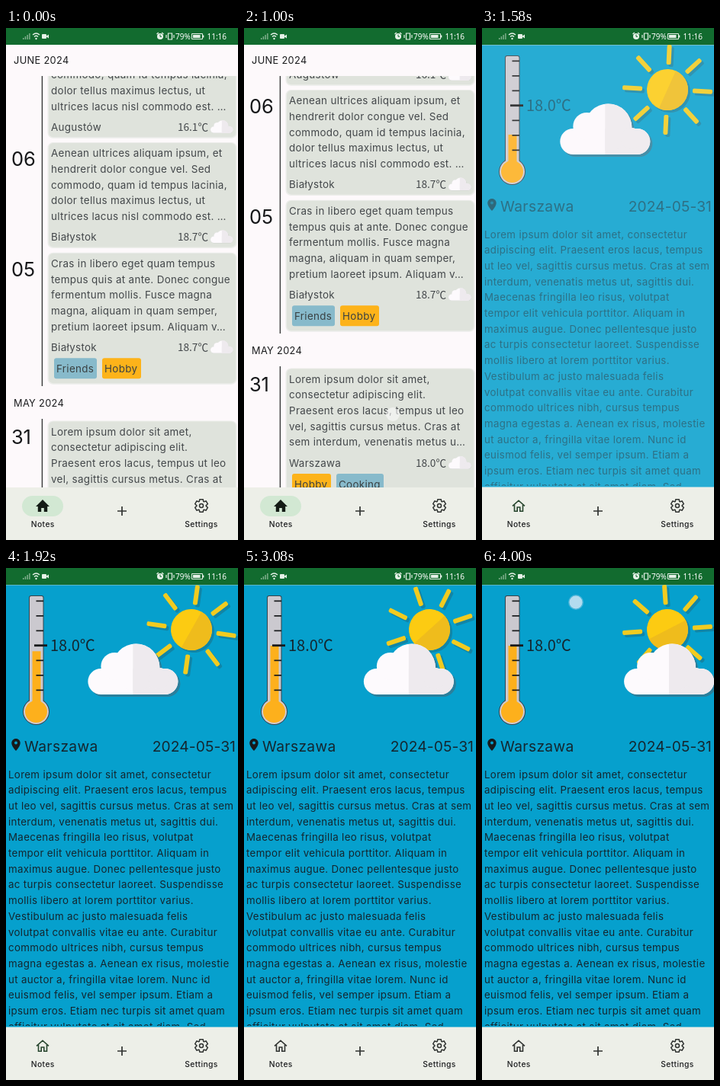
Recreate the animation shown at these times as an HTML page with a canvas. Size 304 px wide and 672 px high, loop 4.08 s.

```html
<!DOCTYPE html>
<html lang="en">
<head>
<meta charset="utf-8">
<title>Weather notes</title>
<style>
html, body { margin: 0; width: 100%; height: 100%; overflow: hidden; background: #fdf9fb; }
canvas { display: block; width: 304px; height: 672px; }
</style>
</head>
<body>
<canvas id="stage" width="304" height="672"></canvas>
<script>
const W = 304, H = 672, LOOP = 4080, STEP = 1000 / 12;
const PAGE_TOP = 22, NAV_TOP = 603, LINE = 20.68;
const BLUE = '#06a0cd', INK = '#1c1d1f', PAPER = '#fdf9fb';

const screen = document.getElementById('stage').getContext('2d');
const layer = document.createElement('canvas');
layer.width = W;
layer.height = H;
const detail = layer.getContext('2d');
let ctx = screen;

const clamp = v => Math.max(0, Math.min(1, v));
const progress = (t, start, length) => clamp((t - start) / length);
const easeOut = u => 1 - (1 - u) ** 2;
const easeSine = u => (1 - Math.cos(Math.PI * u)) / 2;

function rect(x, y, w, h, color) {
  ctx.fillStyle = color;
  ctx.fillRect(x, y, w, h);
}
function round(x, y, w, h, r, color) {
  ctx.fillStyle = color;
  ctx.beginPath();
  ctx.roundRect(x, y, w, h, r);
  ctx.fill();
}
function disc(x, y, r, color) {
  ctx.fillStyle = color;
  ctx.beginPath();
  ctx.arc(x, y, r, 0, 7);
  ctx.fill();
}
function stroke(path, color, width = 1.5) {
  ctx.strokeStyle = color;
  ctx.lineWidth = width;
  ctx.stroke(new Path2D(path));
}
function fill(path, color) {
  ctx.fillStyle = color;
  ctx.fill(new Path2D(path));
}
function text(str, x, y, size, color = INK, { align = 'left', weight = 400, space = 0.33, face = 'Inter' } = {}) {
  ctx.font = `${weight} ${size}px "${face}", "Noto Sans CJK JP", sans-serif`;
  ctx.letterSpacing = space + 'px';
  ctx.textAlign = align;
  ctx.fillStyle = color;
  ctx.fillText(str, x, y);
}
function degrees(str, x, y, size, color, align) {
  text(str, x, y, size, color, { align, space: 0, face: 'Noto Sans CJK SC' });
}
function at(x, y, draw, scale = 1, angle = 0) {
  ctx.save();
  ctx.translate(x, y);
  ctx.rotate(angle);
  ctx.scale(scale, scale);
  draw();
  ctx.restore();
}
function clipped(x, y, w, h, draw) {
  ctx.save();
  ctx.beginPath();
  ctx.rect(x, y, w, h);
  ctx.clip();
  draw();
  ctx.restore();
}
function faded(alpha, draw) {
  ctx.save();
  ctx.globalAlpha = alpha;
  draw();
  ctx.restore();
}

const aenean = ['Aenean ultrices aliquam ipsum, et', 'hendrerit dolor congue vel. Sed',
  'commodo, quam id tempus lacinia,', 'dolor tellus maximus lectus, ut',
  'ultrices lacus nisl commodo est. …'];
const cras = ['Cras in libero eget quam tempus', 'tempus quis at ante. Donec congue',
  'fermentum mollis. Fusce magna', 'magna, aliquam in quam semper,',
  'pretium laoreet ipsum. Aliquam v…'];
const lorem = ['Lorem ipsum dolor sit amet,', 'consectetur adipiscing elit.',
  'Praesent eros lacus, tempus ut leo', 'vel, sagittis cursus metus. Cras at',
  'sem interdum, venenatis metus u…'];
const note = ['Lorem ipsum dolor sit amet, consectetur', 'adipiscing elit. Praesent eros lacus, tempus',
  'ut leo vel, sagittis cursus metus. Cras at sem', 'interdum, venenatis metus ut, sagittis dui.',
  'Maecenas fringilla leo risus, volutpat', 'tempor elit vehicula porttitor. Aliquam in',
  'maximus augue. Donec pellentesque justo', 'ac turpis consectetur laoreet. Suspendisse',
  'mollis libero at lorem porttitor varius.', 'Vestibulum ac justo malesuada felis',
  'volutpat convallis vitae eu ante. Curabitur', 'commodo ultrices nibh, cursus tempus',
  'magna egestas a. Aenean ex risus, molestie', 'ut auctor a, fringilla vitae lorem. Nunc id',
  'euismod felis, vel semper ipsum. Etiam a', 'ipsum eros. Etiam nec turpis sit amet quam',
  'efficitur vulputate at sit amet diam. Sed'];

const friends = { name: 'Friends', width: 56, color: '#87bacb' };
const hobby = { name: 'Hobby', width: 51, color: '#fdb31a' };
const cooking = { name: 'Cooking', width: 62, color: '#87bacb' };
const cards = [
  { top: 6.3, day: '', lines: aenean, city: 'Augustów', temp: '16.1℃', tags: [] },
  { top: 150.6, day: '06', lines: aenean, city: 'Białystok', temp: '18.7℃', tags: [] },
  { top: 295.3, day: '05', lines: cras, city: 'Białystok', temp: '18.7℃', tags: [friends, hobby] },
  { top: 516, day: '31', lines: lorem, city: 'Warszawa', temp: '18.0℃', tags: [hobby, cooking] }
];

function cloudShape(color) {
  round(0, 132, 118, 34, 17, color);
  disc(35, 129, 18, color);
  disc(63, 130.5, 31, color);
  disc(93, 145, 14, color);
}
function cloud() {
  cloudShape('#fdfafd');
  clipped(59, 95, 70, 75, () => cloudShape('#eeeaee'));
}

function drawCard({ top, day, lines, city, temp, tags }) {
  const grey = '#43474a';
  round(54.5, top - .5, 248, tags.length ? 173 : 139, 7, '#ecedea');
  round(56, top + .5, 245, tags.length ? 170.5 : 136.5, 6, '#dfe3dc');
  text(day, 7, top + 30.2, 25.5, '#17181a', { space: -.2 });
  lines.forEach((line, i) => text(line, 59, top + 18.6 + i * LINE, 13.4, grey));
  text(city, 59, top + 128.8, 13.4, grey);
  degrees(temp, 265, top + 128.8, 13.6, grey, 'right');
  at(268, top + 90, () => {
    at(1, 1, () => cloudShape('#c3c7c3'));
    cloud();
  }, .25);
  let x = 63;
  for (const tag of tags) {
    round(x, top + 138, tag.width, 27, 3, tag.color);
    text(tag.name, x + 3, top + 156.5, 13.4, '#3a4142');
    x += tag.width + 7;
  }
}

function drawList(t) {
  const scroll = 69 * easeOut(progress(t, 0, 920));
  rect(0, PAGE_TOP, W, NAV_TOP - PAGE_TOP, PAPER);
  clipped(0, 63, W, NAV_TOP - 63, () => {
    ctx.translate(0, -scroll);
    rect(46.7, 0, 1.4, 470, '#38393a');
    rect(46.7, 513, 1.4, 250, '#38393a');
    cards.forEach(drawCard);
    text('MAY 2024', 10, 496.5, 12.8);
  });
  text('JUNE 2024', 10, 47, 12.8);
  if (t > 900 && t < 1170) disc(195, 507, 9, 'rgba(250,250,250,.6)');
}

function rays(color, width) {
  for (let i = 0; i < 8; i++) {
    at(0, 0, () => round(33, -width / 2, 26, width, 2, color), 1, i * Math.PI / 4);
  }
}
function drawSun(angle) {
  const shade = 'rgba(30,100,120,.45)';
  at(246, 84, () => { rays(shade, 6); disc(0, 0, 27, shade); }, 1, angle);
  at(243, 81, () => {
    rays('#f1cb20', 6);
    disc(0, 0, 27, '#fccb12');
    ctx.beginPath();
    ctx.arc(0, 0, 27, -1.2, 1.95);
    ctx.fillStyle = '#efbc1c';
    ctx.fill();
  }, 1, angle);
}

function drawThermometer(t) {
  const level = 173 - 71 * easeOut(progress(t, 1365, 811));
  const edge = '#34424c';
  disc(39.5, 188.5, 17.5, edge);
  round(30, 36, 19.5, 145, 3, edge);
  disc(39.5, 188.5, 16.5, '#d0cbd0');
  round(31, 37, 17.5, 145, 2, '#cbc9cf');
  rect(34.5, level, 11, 181 - level, '#fdb01c');
  disc(39.5, 188.5, 14.5, '#fdb01c');
  for (let i = 0; i < 7; i++) rect(39.5, 42.5 + i * 19.5, 9.5, 1.7, '#17191b');
  rect(37, 100.3, 17, 2.8, '#17191b');
}

function drawDetailText() {
  const ink = '#14262f';
  degrees('18.0℃', 58, 108.5, 20, ink);
  fill('M13 224c-3.300 0-5.700 2.500-5.700 5.700 0 4.300 5.700 10.300 5.700 10.300s5.700-6 5.700-10.300c0-3.200-2.400-5.700-5.700-5.700z', '#17191b');
  disc(13, 229.6, 2, BLUE);
  text('Warszawa', 24, 241, 19.2, ink);
  text('2024-05-31', 301, 241, 19.2, ink, { align: 'right', space: .1 });
  clipped(0, PAGE_TOP, W, NAV_TOP - PAGE_TOP - 2, () =>
    note.forEach((line, i) => text(line, 3, 275.7 + i * LINE, 13.3, ink)));
}

function drawDetail(t) {
  rect(0, PAGE_TOP, W, NAV_TOP - PAGE_TOP, BLUE);
  rect(0, PAGE_TOP, W, 1, '#5bb8c9');
  rect(0, NAV_TOP - 1, W, 1, '#7cc9dc');
  drawThermometer(t);
  drawSun((8 + (t - 1920) * .0159) * Math.PI / 180);
  const x = 102 + 85 * easeSine(progress(t, 1480, 2700));
  at(x + 3, 3, () => cloudShape('#2b7f9c'));
  at(x, 0, cloud);
  faded(progress(t, 1300, 500), drawDetailText);
  if (t > 3900) {
    disc(123, 45, 10, 'rgba(120,195,225,.6)');
    disc(123, 45, 8.5, '#b3dcef');
  }
}

function drawStatus() {
  const pale = '#e6f1e8', green = '#126b2f';
  rect(0, 0, W, PAGE_TOP, green);
  for (let i = 0; i < 4; i++) rect(22 + i * 2.7, 13 - i * 2, 1.5, 2 + i * 2, '#7fae8b');
  stroke('M35 9Q39.500 5 44 9M37 11.500Q39.500 9 42 11.500', pale, 1.3);
  disc(39.5, 14, 1.2, pale);
  round(47, 8, 6, 6, 1, pale);
  fill('M53 10.500L56 8.500V13.500L53 11.500z', pale);
  disc(202, 11, 4, pale);
  stroke('M202 8.500V11.300H204', green, 1);
  stroke('M197.500 8L199.800 6M206.500 8L204.200 6', pale, 1.2);
  stroke('M212.500 7H217.500V15H212.500zM210 9V13M220 9V13', pale, 1.2);
  text('79%', 222, 14.5, 10, '#fff', { face: 'Noto Sans', space: 0 });
  stroke('M243.500 7.500H257.500V14.500H243.500z', pale, 1);
  rect(245, 9, 9.5, 4, pale);
  rect(258, 9.5, 1.3, 3, pale);
  text('11:16', 263.5, 14.5, 10, '#fff', { face: 'Noto Sans', space: 0 });
}

function gear() {
  let path = '';
  for (let i = 0; i < 6; i++) {
    [[-.47, 6.2], [-.25, 8.6], [.25, 8.6], [.47, 6.2]].forEach(([turn, r]) => {
      const a = i * Math.PI / 3 + Math.PI / 6 + turn;
      path += `${path ? 'L' : 'M'}${r * Math.cos(a)} ${r * Math.sin(a)}`;
    });
  }
  stroke(path + 'z', '#303331', 1.5);
  stroke('M2.500 0A2.500 2.500 0 1 1-2.500 0A2.500 2.500 0 1 1 2.500 0z', '#303331', 1.5);
}

function drawNav(t) {
  const fade = progress(t, 1170, 360);
  const color = t < 2000 ? '#27452d' : '#303331';
  rect(0, NAV_TOP, W, H - NAV_TOP, '#edefe8');
  faded(1 - fade, () => {
    round(21, 614, 54, 27, 13.5, '#d2e8d3');
    at(48, 627, () => fill('M-9 1L0-8 9 1H6.200V8H1.800V3H-1.800V8H-6.200V1z', '#131b15'));
  });
  faded(fade, () => at(48, 627, () =>
    stroke('M-8 .300L0-6.800 8 .300M-5.500-1V7.300H-1.800V2H1.800V7.300H5.500V-1', color, 1.6)));
  stroke('M146 634H158M152 628V640', '#303331', 1.7);
  at(256, 627, gear);
  const label = { align: 'center', weight: 500, space: .4 };
  text('Notes', 48.3, 655, 10.3, INK, label);
  text('Settings', 256, 655, 10.3, INK, label);
}

function render(t) {
  const reveal = progress(t, 1170, 480);
  ctx = screen;
  if (reveal < 1) {
    drawList(t);
    faded(progress(t, 1170, 330), () => rect(0, PAGE_TOP, W, NAV_TOP - PAGE_TOP, PAPER));
  }
  if (reveal > 0) {
    ctx = detail;
    drawDetail(t);
    ctx = screen;
    faded(reveal, () => ctx.drawImage(layer, 0, 0));
  }
  drawStatus();
  drawNav(t);
}

const begin = performance.now();
function tick() {
  const elapsed = (performance.now() - begin) % LOOP;
  const step = Math.min(48, Math.floor((elapsed + 5) / STEP));
  render(step * STEP);
  requestAnimationFrame(tick);
}
tick();
</script>
</body>
</html>
```
